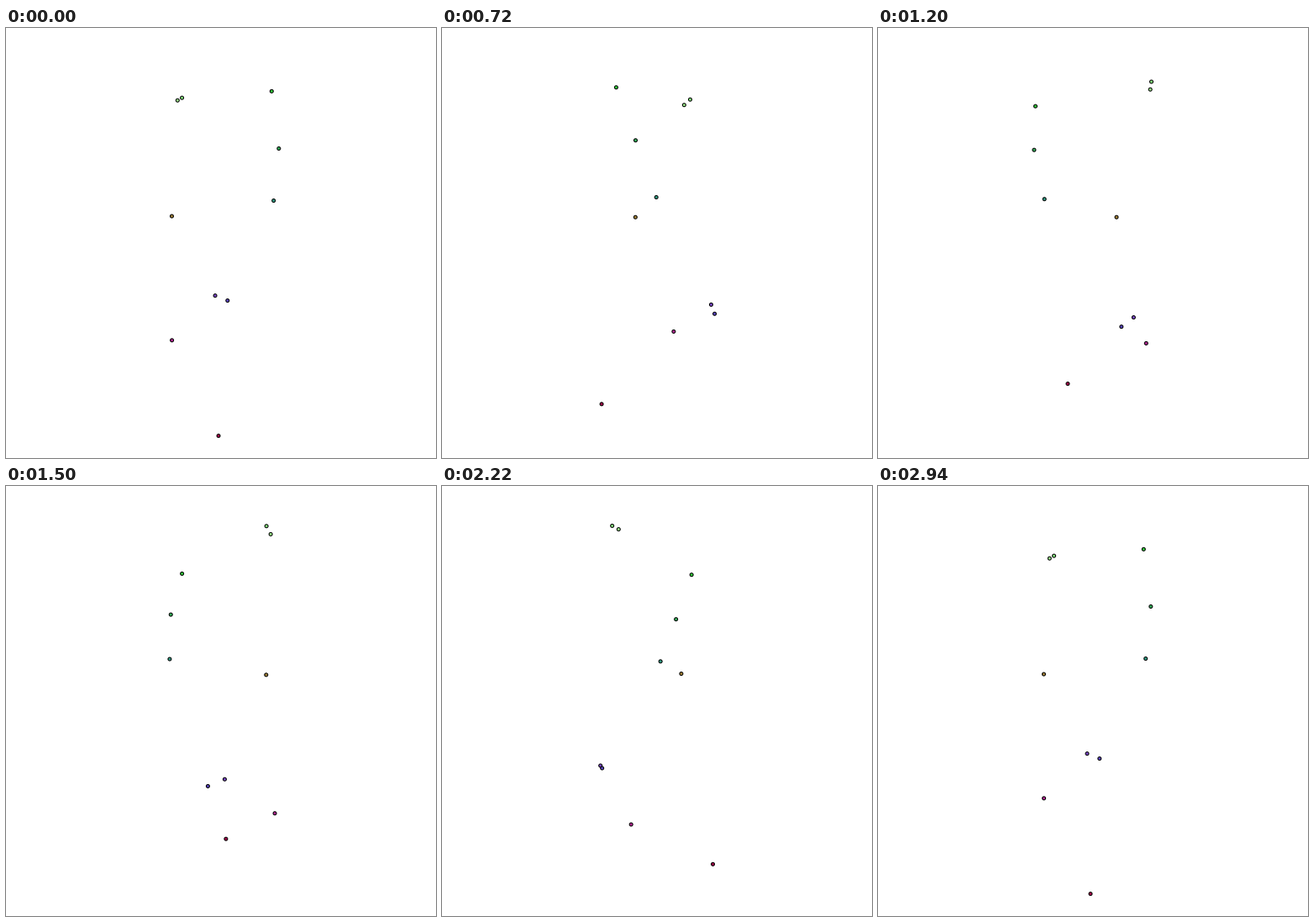
Write a matplotlib script that moves like this. It is 512 by 512 pixels and loops after 3 s.

```python
import numpy as np
import matplotlib.pyplot as plt
from matplotlib.animation import FuncAnimation

SIZE, DPI = 512, 72
FRAMES, INTERVAL = 50, 60
CENTER_X, HORIZON = 256, 231.4
CAMERA = 446  # distance of the eye from the axis

# orbit radius, start angle in degrees, height below the horizon, fill
DOTS = [
    (68.7, 131.8, -163.5, "#84e07c"),
    (68.0, 124.3, -157.7, "#98e488"),
    (70.1, -50.8, -140.6, "#34c83c"),
    (69.4, -69.9, -83.2, "#34ac58"),
    (62.4, -87.5, -25.7, "#309880"),
    (61.3, 63.8, -6.9, "#a08038"),
    (66.7, 173.1, 100.2, "#7848c4"),
    (67.9, 187.6, 107.2, "#5844bc"),
    (66.4, 111.8, 148.2, "#b02890"),
    (66.0, 2.2, 216.6, "#a00848"),
]
radius, start, height = np.array([d[:3] for d in DOTS]).T
fills = [d[3] for d in DOTS]


def project(turn):
    """Perspective view of the dots after turning about the vertical axis."""
    angle = np.radians(start) + turn
    scale = 1 / (1 - radius * np.cos(angle) / CAMERA)
    x = CENTER_X - radius * np.sin(angle) * scale
    y = HORIZON + height * scale
    return np.column_stack([x, y])


fig = plt.figure(figsize=(SIZE / DPI, SIZE / DPI), dpi=DPI, facecolor="white")
ax = fig.add_axes([0, 0, 1, 1])
ax.set(xlim=(0, SIZE), ylim=(SIZE, 0))
ax.axis("off")
dots = ax.scatter(*project(0).T, s=16, c=fills, edgecolors="black", linewidths=1)


def update(frame):
    # first and last pose coincide
    dots.set_offsets(project(2 * np.pi * frame / (FRAMES - 1)))
    return (dots,)


anim = FuncAnimation(fig, update, frames=FRAMES, interval=INTERVAL,
                     repeat=True, repeat_delay=0)
plt.show()
```
